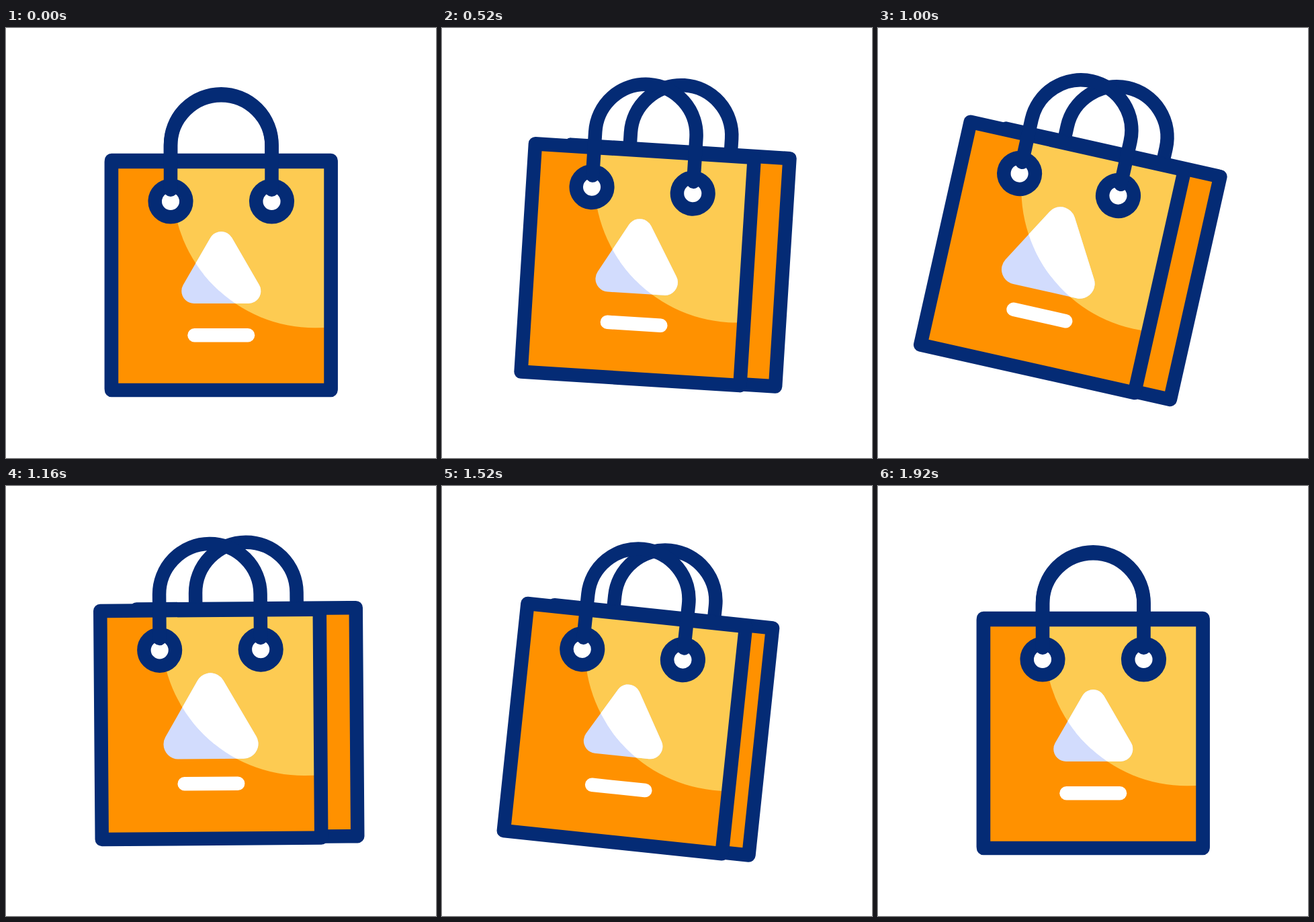
An HTML page for the animation above (2000 ms loop, 640 by 640 pixels).

```html
<!DOCTYPE html>
<html lang="en">
<head>
<meta charset="utf-8">
<title>Shopping bag</title>
<style>
  html, body { margin: 0; width: 100%; height: 100%; overflow: hidden; background: #fff; }
  svg { display: block; width: 100vw; height: 100vh; }
  .line { fill: none; stroke: #042b75; stroke-width: 20.5; stroke-linejoin: round; stroke-linecap: round; }
  .panel { fill: #ff9100; }
  .hole { fill: #fff; }
</style>
</head>
<body>
<svg viewBox="0 0 640 640">
  <defs>
    <!-- Bag parts are placed around the point midway between the two rings. -->
    <rect id="panel" x="-163.25" y="-59" width="326.5" height="340"/>
    <path id="handle" d="M-75.25-17.3V-82.5A75.25 75.25 0 0 1 75.25-82.5V-17.3"/>
    <path id="peak" d="M0 63.5L40.5 133.5H-40.5Z" stroke-width="37" stroke-linejoin="round"/>
    <circle id="ring" r="23.3" class="line hole"/>
    <circle id="glow" cx="139.75" cy="-24" r="212.3"/>
    <clipPath id="inPanel"><use href="#panel"/></clipPath>
    <clipPath id="inGlow"><use href="#glow"/></clipPath>
  </defs>
  <g id="back">
    <path class="line" d="M-75.25-59V-82.5A75.25 75.25 0 0 1 75.25-82.5V-59"/>
    <use href="#panel" class="line panel"/>
  </g>
  <g id="front">
    <use href="#panel" class="panel"/>
    <g clip-path="url(#inPanel)"><use href="#glow" fill="#fdcb52"/></g>
    <use href="#panel" class="line"/>
    <g class="badge" fill="#d2dcfd" stroke="#d2dcfd"><use href="#peak"/></g>
    <g clip-path="url(#inGlow)">
      <g class="badge" fill="#fff" stroke="#fff"><use href="#peak"/></g>
    </g>
    <rect x="-50" y="189" width="100" height="20.5" rx="10.25" fill="#fff"/>
    <use href="#ring" x="-75.25"/>
    <use href="#ring" x="75.25"/>
    <use href="#handle" class="line"/>
  </g>
</svg>
<script>
const LOOP = 2000, STEP = 40;
const PIVOT = { x: 340.5, y: 151.7 };
const REST = { x: -20.25, y: 106.3 };

const back = document.getElementById("back");
const front = document.getElementById("front");
const badges = document.querySelectorAll(".badge");

// Sine ease from 0 to 1 between two times.
function ease(t, from, to) {
  const p = Math.min(1, Math.max(0, (t - from) / (to - from)));
  return (1 - Math.cos(Math.PI * p)) / 2;
}

// Rises during one span of time and falls back during a later one.
const pulse = (t, riseFrom, riseTo, fallFrom, fallTo) =>
  ease(t, riseFrom, riseTo) - ease(t, fallFrom, fallTo);

// Two full rocks around a tilted middle, then a smaller one to rest.
function swing(t) {
  const high = 13.3, low = -6.5, last = 9;
  return high * ease(t, 60, 368)
    + (low - high) * pulse(t, 368, 676, 676, 964)
    + (low - high) * ease(t, 964, 1277)
    + (last - low) * ease(t, 1277, 1619)
    - last * ease(t, 1619, 1910);
}

function place(node, angle, x, y) {
  node.setAttribute("transform",
    `translate(${PIVOT.x} ${PIVOT.y}) rotate(${angle}) translate(${REST.x + x} ${REST.y + y})`);
}

function draw(t) {
  const angle = swing(t);
  const spread = 27 * pulse(t, 123, 564, 1381, 1789);
  const drift = 10 * pulse(t, 90, 540, 1190, 1520) - 6 * pulse(t, 1190, 1520, 1520, 1700);
  const lift = -14.5 * pulse(t, 150, 565, 1190, 1620);
  const scale = 1 + 0.195 * pulse(t, 430, 735, 1190, 1500);

  place(front, angle, drift - spread, lift);
  place(back, angle, drift + spread, lift - 2);
  for (const badge of badges) {
    badge.setAttribute("transform", `translate(0 98.5) scale(${scale}) translate(0 -98.5)`);
  }
}

const start = performance.now();
function tick() {
  const t = (performance.now() - start) % LOOP;
  draw(Math.floor(t / STEP) * STEP);
  requestAnimationFrame(tick);
}
tick();
</script>
</body>
</html>
```
